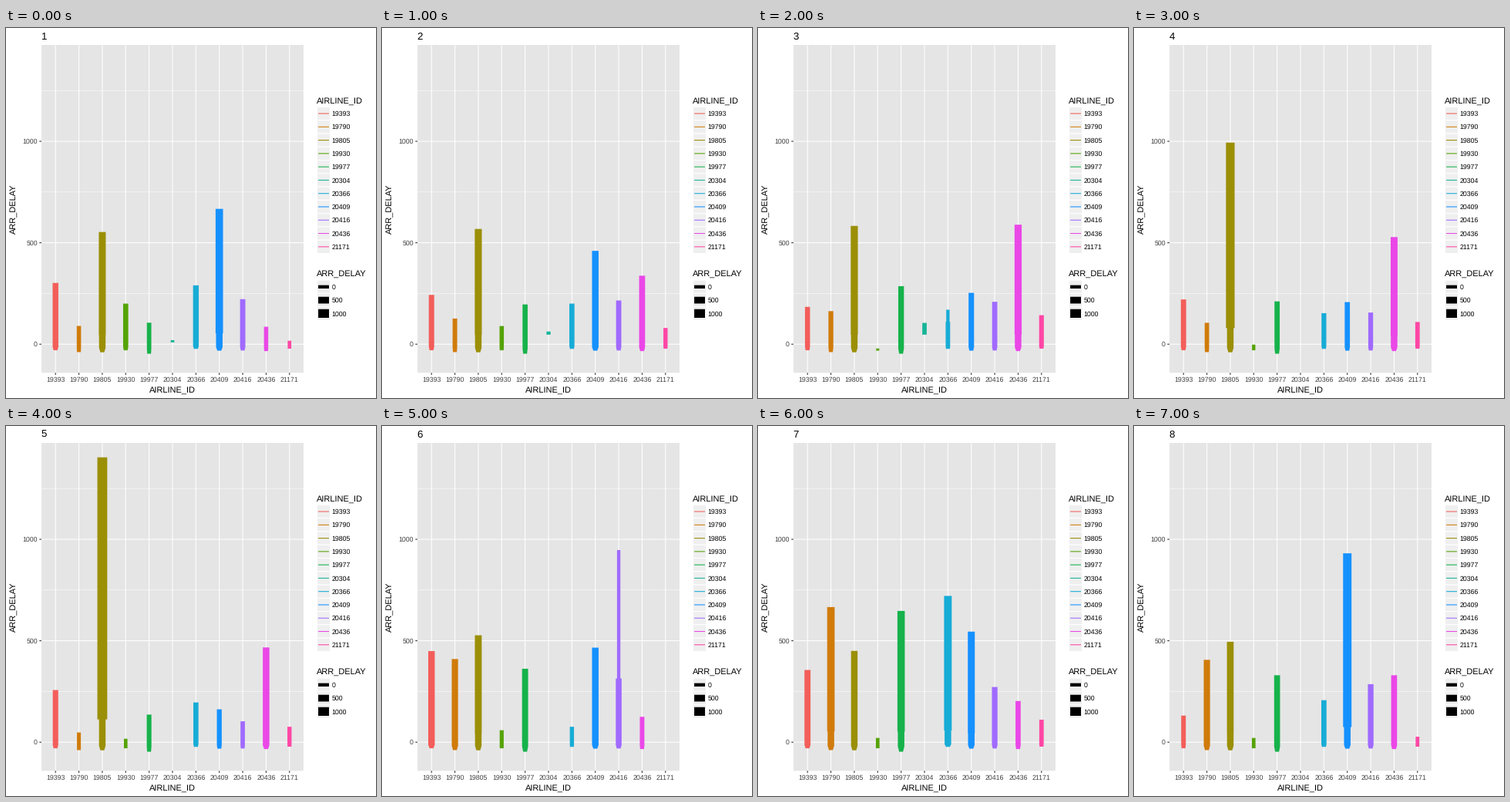
Animation, 480 px wide and 480 px high, one loop 8 s. Source, as a matplotlib script:

```python
import math

import matplotlib.pyplot as plt
import numpy as np
from matplotlib.animation import FuncAnimation
from matplotlib.patches import Polygon, Rectangle

plt.rcParams.update({"path.snap": False, "text.hinting": "none",
                     "font.family": "Liberation Sans"})

DPI = 100
PX = 72 / DPI  # points per pixel
LEFT, RIGHT, TOP, BOTTOM = 46, 386, 22, 447.3
ZERO_Y, SCALE = 410.2, 0.2632
KEY = 17.28
TEXT_GREY, TICK_GREY = "#404040", "#333333"
GAP = math.nan  # no flights

# Airline: colour, earliest arrival, worst delay on each of KEY_DAYS.
DAYS, KEY_DAYS = 8, (1, 3, 5, 6, 7, 8)
AIRLINES = {
    "19393": ("#F35E5A", -30, (302, 184, 257, 449, 356, 131)),
    "19790": ("#D07B0B", -39, (90, 163, 48, 410, 666, 406)),
    "19805": ("#9B8F06", -40, (553, 583, 1404, 527, 450, 495)),
    "19930": ("#55A306", -30, (200, -21, 17, 59, 21, 21)),
    "19977": ("#16B24B", -47, (106, 286, 136, 362, 647, 330)),
    "20304": ("#17B598", 47, (20, 105, GAP, GAP, GAP, GAP)),
    "20366": ("#17ACD6", -23, (290, 110, 196, 76, 721, 207)),
    "20409": ("#1591FF", -32, (667, 253, 162, 466, 545, 931)),
    "20416": ("#A06AFF", -31, (222, 209, 103, 314, 272, 286)),
    "20436": ("#EA47E7", -34, (86, 589, 467, 125, 203, 330)),
    "21171": ("#FE47A5", -22, (17, 143, 76, GAP, 111, 27)),
}
# Lone late flights that rise from a bar as a thin line.
OUTLIERS = {("20366", 3): 170, ("20416", 6): 947}


def y_px(delay):
    return ZERO_Y - SCALE * delay


def x_px(index):
    return LEFT + (RIGHT - LEFT) * (index + 0.6) / 11.2


def line_width(delay):
    """Area scale: sizes 1 to 6 mm over the whole range of delays."""
    share = min(max((delay + 62) / 1466, 0), 1)
    return 2.134 * (1 + 5 * math.sqrt(share))


def bar_outline(x, peak, floor, tip):
    """Full width at the top, a slimmer shoulder near zero, a narrow foot."""
    floor = min(floor, peak - 11)
    full, foot = line_width(peak), line_width(0)
    shoulder = min(full, 8.5)
    knee = max(0.08 * peak, floor)
    steps = [(tip, foot), (peak, foot), (peak, full), (knee, full),
             (knee, shoulder)]
    if floor < knee:
        ankle = min(knee, 0.45 * floor) if floor < 0 else floor
        steps += [(ankle, shoulder), (floor, min(full, 1.15 * foot))]
    right = [(x + w / 2, y_px(v)) for v, w in steps]
    left = [(x - w / 2, y_px(v)) for v, w in reversed(steps)]
    return right + left


fig = plt.figure(figsize=(480 / DPI, 480 / DPI), dpi=DPI, facecolor="white")
ax = fig.add_axes([0, 0, 1, 1])
ax.set_xlim(0, 480)
ax.set_ylim(480, 0)
ax.axis("off")


def line(xs, ys, color, width, z=2):
    ax.plot(xs, ys, color=color, lw=width * PX, solid_capstyle="butt", zorder=z)


def label(x, y, text, size, color="black", **kw):
    return ax.text(x, y, text, fontsize=size * PX, color=color, **kw)


def draw_panel():
    ax.add_patch(Rectangle((LEFT, TOP), RIGHT - LEFT, BOTTOM - TOP,
                           fc="#E5E5E5", lw=0))
    for delay in (250, 750, 1250):
        line((LEFT, RIGHT), [y_px(delay)] * 2, "white", 0.53)
    for delay in (0, 500, 1000):
        y = y_px(delay)
        line((LEFT, RIGHT), (y, y), "white", 1.07)
        line((LEFT - 2.75, LEFT), (y, y), TICK_GREY, 1.07)
        label(41, y + 3.1, str(delay), 8.8, TEXT_GREY, ha="right")
    for i, name in enumerate(AIRLINES):
        x = x_px(i)
        line((x, x), (TOP, BOTTOM), "white", 1.07)
        line((x, x), (BOTTOM, BOTTOM + 2.75), TICK_GREY, 1.07)
        label(x, 459, name, 8.8, TEXT_GREY, ha="center")
    label(216, 472.4, "AIRLINE_ID", 11, ha="center")
    label(15.2, 235, "ARR_DELAY", 11, ha="right", va="center", rotation=90)


def draw_legend(title, title_y, entries):
    """Entries are (text, colour, line width), one key below the other."""
    label(403.3, title_y, title, 11)
    for i, (text, color, width) in enumerate(entries):
        y = title_y + 13.6 + KEY * i
        ax.add_patch(Rectangle((403.4, y - KEY / 2), KEY, KEY, fc="#EFEFEF",
                               ec="white", lw=1.07 * PX))
        line((405.1, 419), (y, y), color, width, 3)
        label(422.3, y + 3.1, text, 8.8)


draw_panel()
draw_legend("AIRLINE_ID", 97.4,
            [(name, color, 1.07) for name, (color, _, _) in AIRLINES.items()])
draw_legend("ARR_DELAY", 322.2,
            [(str(d), "black", line_width(d)) for d in (0, 500, 1000)])
title = label(45.6, 14.6, "1", 13.2)
bars = [ax.add_patch(Polygon([(0, 0), (0, 1), (1, 1)], fc=color, lw=0, zorder=4))
        for color, _, _ in AIRLINES.values()]


def update(frame):
    day = frame % DAYS + 1
    title.set_text(str(day))
    for i, (name, (_, floor, peaks)) in enumerate(AIRLINES.items()):
        peak = np.interp(day, KEY_DAYS, peaks)
        flying = not math.isnan(peak)
        bars[i].set_visible(flying)
        if flying:
            tip = OUTLIERS.get((name, day), peak)
            bars[i].set_xy(bar_outline(x_px(i), peak, floor, tip))
    return [title, *bars]


anim = FuncAnimation(fig, update, frames=DAYS, interval=1000,
                     repeat=True, repeat_delay=0)
plt.show()
```
